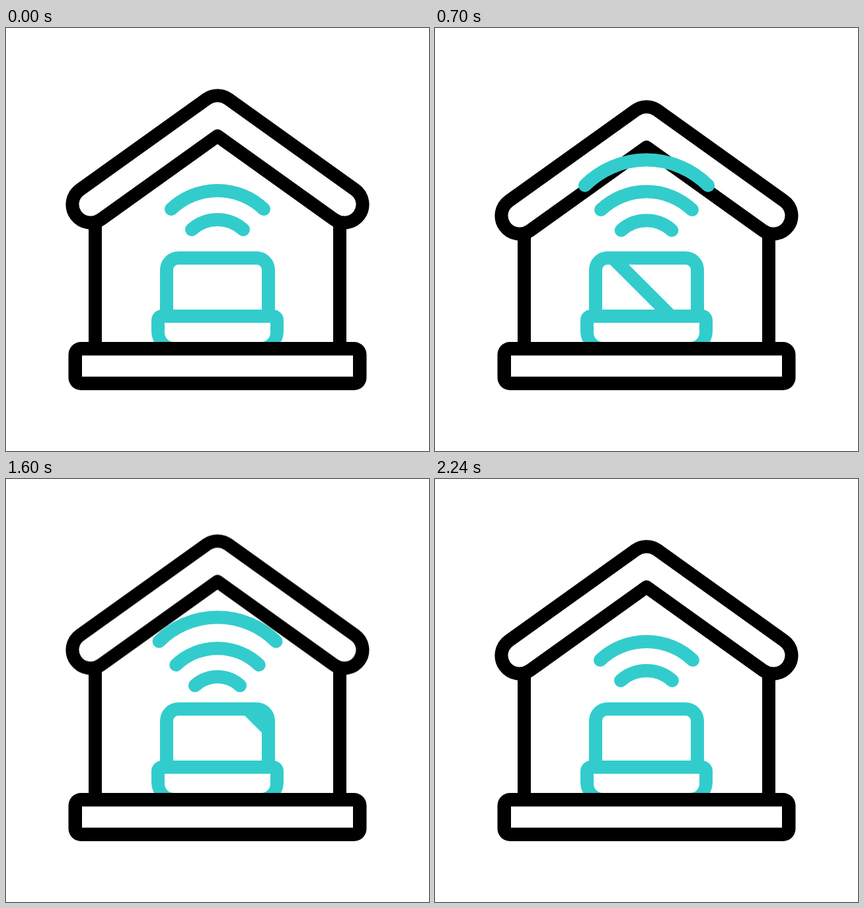
These frames come from a looping animation (640 px wide and 640 px high, 2.4 s). An HTML page:

```html
<!DOCTYPE html>
<html lang="en">
<head>
<meta charset="utf-8">
<title>Smart home</title>
<style>
  html, body { margin: 0; width: 100%; height: 100%; overflow: hidden; background: #fff; }
  svg { display: block; width: 100%; height: 100%; }
  .ink { fill: none; stroke: #000; stroke-width: 20; stroke-linejoin: round; }
  .teal { fill: none; stroke: #33cccc; stroke-width: 20; stroke-linecap: round; stroke-linejoin: round; }
  #roof { animation: bob 2400ms infinite; }
  #shine { animation: sweep 2400ms linear infinite; }

  @keyframes bob {
    0%, 8.333% { transform: translateY(0); animation-timing-function: ease-in-out; }
    29.167% { transform: translateY(17px); animation-timing-function: ease-in-out; }
    63.889% { transform: translateY(-8.5px); animation-timing-function: ease-in-out; }
    91.667%, 100% { transform: translateY(0); }
  }
  @keyframes sweep {
    0%, 8.333% { transform: translateX(-150px); }
    29.167%, 53.333% { transform: translateX(0); }
    74.167%, 100% { transform: translateX(150px); }
  }
</style>
</head>
<body>
<svg viewBox="0 0 640 640">
  <clipPath id="screen"><rect x="243" y="348" width="154" height="88"/></clipPath>

  <g id="roof" class="ink">
    <path d="M135 290V500M505 290V500"/>
    <path d="M112 244.6L303.7 107.4A28 28 0 0 1 336.3 107.4L528 244.6A27.5 27.5 0 0 1 496 289.4L320 163.4L144 289.4A27.5 27.5 0 0 1 112 244.6Z"/>
  </g>

  <path id="waves" class="teal"/>

  <g class="teal">
    <path d="M243 436V366a18 18 0 0 1 18-18h118a18 18 0 0 1 18 18v70"/>
    <g clip-path="url(#screen)"><path id="shine" d="M230 309L430 509"/></g>
  </g>
  <path fill="#33cccc" fill-rule="evenodd"
    d="M236 426H404a16 16 0 0 1 16 16V459a34 34 0 0 1-34 34H254a34 34 0 0 1-34-34V442a16 16 0 0 1 16-16Z
       M240 446H400V461a14 14 0 0 1-14 14H254a14 14 0 0 1-14-14Z"/>

  <rect x="94.5" y="475" width="451" height="73" rx="19"/>
  <rect x="115" y="495.5" width="410" height="32" fill="#fff"/>
</svg>
<script>
  const START = 200, STEP = 500, CYCLES = 4, LOOP = 2400;
  // Arc poses from the laptop outwards: half width, end y, top y
  const POSES = [[18, 337, 330], [39, 305, 290], [70, 274, 246], [94, 237, 198]];
  const waves = document.getElementById('waves');
  const clock = document.getElementById('roof').getAnimations()[0];
  const clamp = (v, lo, hi) => Math.min(hi, Math.max(lo, v));

  function arc(u) {
    u = clamp(u, 0, 3);
    const i = Math.min(2, Math.floor(u));
    const [w, y, top] = POSES[i].map((a, n) => a + (POSES[i + 1][n] - a) * (u - i));
    const rise = y - top, r = (w * w + rise * rise) / (2 * rise);
    return `M${320 - w} ${y}A${r} ${r} 0 0 1 ${320 + w} ${y}`;
  }

  function draw() {
    const t = (clock.currentTime || 0) % LOOP;
    const p = clamp((t - START) / STEP, 0, CYCLES);
    // At rest only the two middle arcs show
    const [lo, hi] = p > 0 && p < CYCLES ? [-0.03, 3.03] : [1, 2];
    let d = '';
    for (let k = -2; k < CYCLES; k++) {
      const u = p - k;
      if (u >= lo && u <= hi) d += arc(u);
    }
    waves.setAttribute('d', d);
    requestAnimationFrame(draw);
  }
  draw();
</script>
</body>
</html>
```
